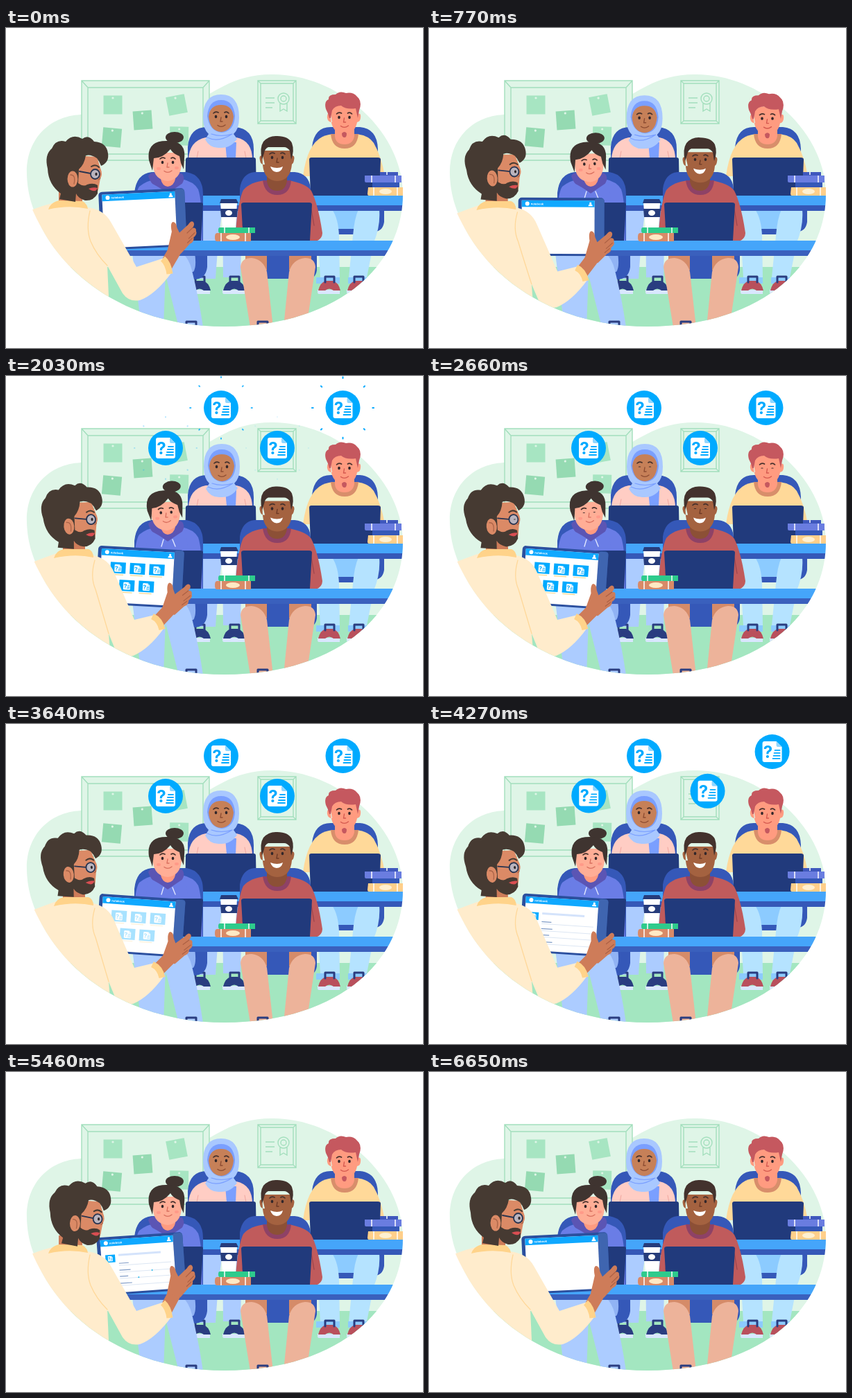
An HTML page for the animation above (6720 ms loop, 601 by 462 pixels).

```html
<!DOCTYPE html>
<html lang="en">
<head>
<meta charset="utf-8">
<title>Classroom questions</title>
<style>
html,body{margin:0;width:100%;height:100%;overflow:hidden;background:#fff}
svg{display:block;width:100vw;height:100vh}
text{font-family:Inter,Roboto,sans-serif;font-weight:700}
.line{fill:none;stroke-linecap:round;stroke-linejoin:round}
.frame{fill:#dff5e7;stroke:#a3dfbd;stroke-width:1.4}
#cuff{stroke-linecap:butt}
</style>
</head>
<body>
<svg viewBox="0 0 601 462">
<defs>
  <path id="blob" d="M30 212C28 160 64 125 112 125C170 124 215 125 262 112C300 95 325 67 383 67C480 66 572 150 572 240C572 345 475 431 315 431C190 431 95 370 52 290C38 262 31 240 30 212Z"/>
  <clipPath id="stage"><path d="M0 0H601V240H572C572 345 475 431 315 431C190 431 95 370 52 290Q43 274 38 262L0 240Z"/></clipPath>
  <clipPath id="ground"><use href="#blob"/></clipPath>
  <g id="doc">
    <path fill="#fff" d="M-11 -15H6L14 -7V12Q14 15 11 15H-11Q-14 15 -14 12V-12Q-14 -15 -11 -15Z"/>
    <path fill="#8fd6ff" d="M6 -15V-9Q6 -7 8 -7H14Z"/>
    <text x="-6" y="9" font-size="24" text-anchor="middle" fill="#0af">?</text>
    <path class="line" stroke="#0af" stroke-width="1.8" d="M4 -2H11M3 2H11M2 6H11M1 10H11"/>
  </g>
  <g id="icon"><circle r="25" fill="#0af"/><use href="#doc"/></g>
  <g id="card">
    <rect x="-11" y="-8.5" width="22" height="16" fill="#0af"/>
    <use href="#doc" transform="scale(.36)"/>
    <path stroke="#ffd78e" stroke-width="1.2" d="M-10 9.5H8"/>
  </g>
</defs>

<use href="#blob" fill="#dff5e7"/>
<path clip-path="url(#ground)" fill="#a3e6c0" d="M0 345H601V462H0Z"/>

<g id="wall">
  <path class="frame" d="M109 76H293V191H109ZM118 86H284V182H118ZM109 76L118 86M293 76L284 86M109 191L118 182M293 191L284 182"/>
  <path class="frame" d="M363 76H418V138H363ZM367 80H414V134H367ZM363 76L367 80M418 76L414 80M363 138L367 134M418 138L414 134M374 101H387M374 108H387M374 115H384M395 109V120L400 117L405 120V109"/>
  <circle class="frame" cx="400" cy="102" r="8"/><circle class="frame" cx="400" cy="102" r="4"/>
</g>

<g clip-path="url(#stage)">
  <!-- back row: chairs and bodies -->
  <path fill="#3558b8" d="M262 200V172Q264 143 290 143H330Q357 145 357 175V200ZM441 200V172Q444 143 468 143H510Q535 145 536 175V200Z"/>
  <path fill="#ffcdc4" d="M263 190Q264 163 288 158H332Q355 163 355 190Z"/>
  <path class="line" stroke="#efa79f" d="M275 188L277 178M346 188L344 178"/>
  <path fill="#7a9fff" d="M316 165H332L331 188H318Z"/>
  <path fill="#ffd999" d="M428 214Q434 168 456 157Q465 153 475 153H503Q522 154 530 166Q541 185 546 214Z"/>
  <path fill="#d88e6b" d="M468 153H508Q506 174 488 174Q470 174 468 153Z"/>
  <path fill="#ff9b80" d="M474 144H502V156Q500 168 488 168Q475 168 474 156Z"/>
  <g id="h1">
    <path fill="#a9c8ff" d="M284 129Q284 96 310 96Q336 96 336 129Q336 146 328 153L333 160Q324 174 308 173Q294 174 287 161L292 153Q284 146 284 129Z"/>
    <path fill="#7a9fff" d="M290 127Q292 104 310 104Q328 104 330 127Q329 149 311 151Q293 149 290 127Z"/>
    <path fill="#c68058" d="M292 128Q294 111 310 111Q326 111 328 128Q326 149 310 150Q294 149 292 128Z"/>
    <path class="line" stroke="#7a9fff" stroke-width="1.2" d="M290 158Q306 166 326 153M296 153Q310 158 326 153"/>
  </g>
  <g id="h2">
    <path fill="#ff9b80" d="M468 112H507V128Q506 152 488 154Q470 152 468 131ZM468 124Q462 122 463 130Q464 136 470 136ZM507 124Q512 122 511 130Q510 136 506 136Z"/>
    <path fill="#c5585f" d="M466 130Q464 122 461 117Q458 106 465 103Q464 96 475 96Q481 90 490 94Q500 92 506 99Q514 106 509 119L507 130L504 116Q490 118 483 112Q474 112 470 119L468 130ZM484 152Q488 148 491 152Q491 158 488 158Q484 158 484 152Z"/>
  </g>
  <!-- back row: seats, legs, desk -->
  <path fill="#3558b8" d="M443 262H545V280Q543 294 530 294H503V298H473V294H445Z"/>
  <path fill="#8ccbff" d="M468 262H508V290H468Z"/>
  <path fill="#b5e3ff" d="M447 262H470Q479 275 480 300L481 360H453ZM508 262H538Q540 285 530 310L520 360H494L500 300Q502 275 508 262Z"/>
  <path fill="#acccff" d="M283 262H312Q306 300 302 362H277ZM312 262H340L338 360H313Z"/>
  <path fill="#8ccbff" d="M447 360H481V369H447ZM493 360H521V369H493Z"/>
  <g id="shoes"></g>
  <path fill="#45a5fa" d="M265 242H601V256H265Z"/><path fill="#3558b8" d="M265 256H601V264H265Z"/>
  <path fill="#213a7c" d="M262 187H357Q360 187 360 190L361 242H258L259 190Q259 187 262 187ZM440 187H536Q540 187 540 190L538 242H439L437 190Q437 187 440 187Z"/>
  <g>
    <path fill="#3f58bd" d="M539 208H565V213H539Z"/>
    <path fill="#6a7de0" d="M517 213H570V223H519Q517 223 517 221Z"/>
    <path stroke="#fff" stroke-width="1.5" d="M527 213V223M561 213V223M549 208V212"/>
    <path fill="#3558b8" d="M528 223H567V231H528Z"/>
    <path fill="#ffcf8a" d="M522 230H572V242H523Q521 242 521 239Z"/>
    <ellipse cx="547" cy="236" rx="9" ry="4" fill="#fff0cf"/>
    <path stroke="#fff" stroke-width="1.5" d="M530 230V242M564 230V242"/>
  </g>

  <!-- front row -->
  <path fill="#3558b8" d="M185 310V238Q188 210 210 208H260Q284 212 284 240V310ZM337 260V232Q340 210 358 208H416Q437 210 439 232V260Z"/>
  <path fill="#6a7de6" d="M183 308Q184 240 192 229Q203 220 218 218H252Q270 221 277 233Q283 250 283 308Z"/>
  <path fill="#5b55b4" d="M205 214Q207 208 218 209H250Q258 211 256 220Q250 236 234 239Q212 234 205 214Z"/>
  <path fill="#ff9b80" d="M223 208H244V218Q242 228 233 229Q225 228 223 218Z"/>
  <path fill="#6a7de6" d="M205 222Q222 230 233 239Q246 230 258 222L262 245H202Z"/>
  <path class="line" stroke="#dfe6ff" stroke-width="1.4" d="M227 236L224 246M240 236L244 246"/>
  <path fill="#c05b5c" d="M330 304Q334 250 342 234Q352 222 374 220H406Q432 224 440 235Q450 255 456 296Q456 304 447 308H338Q330 308 330 304Z"/>
  <path class="line" stroke="#9c454d" stroke-width="1.3" d="M344 262L341 285M440 262L444 285"/>
  <path fill="#8e4266" d="M370 220H411Q409 241 391 241Q373 241 370 220Z"/>
  <path fill="#8c5036" d="M376 207H405V220Q403 235 391 235Q378 235 376 221Z"/>
  <g id="h0">
    <ellipse cx="243" cy="158" rx="13" ry="8" fill="#3f3430"/>
    <path fill="#ffae96" d="M211 180H253V198Q251 219 233 221Q214 219 212 200Z"/>
    <path fill="#3f3430" d="M206 191Q202 163 231 163Q260 162 257 188L256 204L252 195L250 185Q240 181 237 175Q226 188 213 188L212 197L211 206Z"/>
    <path class="line" stroke="#ff8179" stroke-width="4" opacity=".45" d="M219 203H221M245 202H247"/>
  </g>
  <g id="h3">
    <path fill="#a46240" d="M369 177H412V197Q410 220 391 221Q372 220 370 198ZM370 184Q364 183 366 191Q367 198 373 197ZM411 184Q417 183 415 191Q414 198 409 197Z"/>
    <path fill="#43322d" d="M369 190Q365 173 371 164Q379 155 391 156Q407 156 412 166Q416 177 411 190L409 177Q405 172 401 172H378Q373 174 372 181Z"/>
  </g>
  <path fill="#3558b8" d="M252 325H290V345Q288 363 270 363H258ZM350 325H448V350Q446 362 436 362H376Z"/>
  <path fill="#91b3f4" d="M250 325H272Q275 345 270 352H252Z"/>
  <path fill="#acccff" d="M182 325H231L227 432H195ZM222 325H254Q264 333 268 350Q278 390 284 432H249Z"/>
  <path fill="#d58b69" d="M345 325H376V350H345ZM408 325H440V350H408Z"/>
  <path fill="#edb39a" d="M338 345Q339 332 354 332Q371 334 376 352L385 432H352ZM446 345Q445 332 431 332Q413 334 408 352L400 432H433Z"/>
  <path class="line" stroke="#2a3d80" stroke-width="3" d="M260 430V424H274V430M363 430V424H377V430"/>
  <path fill="#45a5fa" d="M170 307H601V321H170Z"/><path fill="#3a60bd" d="M170 321H601V329H170Z"/>
  <path fill="#213a7c" d="M343 252H437Q441 252 441 255L438 307H342L339 255Q339 252 343 252ZM190 252H281Q284 252 284 255L281 307H190Z"/>
  <path fill="#fff" d="M309 252H333L331 289H312Z"/>
  <path fill="#263c7b" d="M308 253L310 247H332L335 253ZM309 261H334L333 273H310Z"/>
  <ellipse cx="321" cy="267" rx="5" ry="4" fill="#fff"/>
  <path fill="#2ecb8c" d="M308 288H359V296H308Q306 296 306 292Q306 288 308 288Z"/>
  <path fill="#d88a68" d="M304 296H353V308H304Q301 308 301 302Q301 296 304 296Z"/>
  <ellipse cx="327" cy="302" rx="10" ry="4" fill="#ffe9c4"/>
  <path stroke="#fff" stroke-width="1.5" d="M315 288V296M350 288V296M310 296V308M345 296V308"/>

  <!-- teacher -->
  <g class="tablet">
    <rect x="-62" y="-42" width="124" height="84" rx="5" fill="#2b4f9e"/>
    <rect x="48" y="-41" width="14" height="82" rx="4" fill="#3f65b0"/>
    <rect x="-57" y="-38" width="105" height="77" fill="#fff"/>
    <rect x="-57" y="-38" width="105" height="9.5" fill="#0fa8ff"/>
    <circle cx="-49" cy="-33.3" r="3" fill="#fff"/>
    <text x="-44" y="-31.5" font-size="4" fill="#fff">notebook</text>
    <circle cx="42" cy="-34.2" r="1.6" fill="#fff"/><path fill="#fff" d="M39 -30Q39 -33 42 -33Q45 -33 45 -30Z"/>
    <g id="cards"></g>
    <g id="detail">
      <rect x="-51" y="-16" width="14" height="11" fill="#0af"/>
      <use href="#doc" transform="translate(-44 -10.5) scale(.25)"/>
      <path stroke="#d4e3fb" stroke-width="3" d="M-32 -15H29"/>
      <path stroke="#dce6f3" stroke-width="1" d="M-32 0H43M-32 10H43M-32 19H43M-32 29H43"/>
      <path stroke="#7f9bc7" stroke-width="1.2" d="M-32 -3H-18M-32 7H-16M-32 16H-20M-32 26H-15"/>
      <g id="dots" fill="#1cb5e8"></g>
    </g>
  </g>
  <path id="forearm" class="line" stroke="#ce7c59" stroke-width="19"/>
  <g class="tablet">
    <path fill="#ce7c59" d="M41 20Q39 8 43 6Q48 6 49 15L52 22L65 11Q70 4 73 8Q75 12 71 16Q77 15 76 21Q78 25 72 30Q73 36 66 39L53 52L34 45Z"/>
    <path class="line" stroke="#ac6044" stroke-width="1.2" d="M71 16L63 23M74 23L65 31M70 31L63 37"/>
  </g>
  <path id="neck" fill="#ce7c59"/>
  <path id="shirt" fill="#ffeccc"/>
  <path id="cuff" class="line" stroke="#ffd38a" stroke-width="9"/>
  <path id="seam" class="line" stroke="#ffd89a" stroke-width="1.3"/>
  <path id="collar" fill="#ffd38a"/>
  <g id="head">
    <path fill="#db8a66" d="M98 184L131 186L136 202Q140 212 136 217L134 228Q132 247 116 248Q98 243 96 220Z"/>
    <path fill="#463a32" d="M77 247L79 239Q61 226 60 203Q55 183 66 174Q72 160 86 164Q96 152 110 160Q119 153 127 164Q145 165 147 181Q149 194 137 199Q135 193 131 188Q122 182 115 184Q113 197 105 204L104 224Q112 230 117 226Q126 223 132 227L132 239Q126 250 114 249Q104 246 101 239L100 251Z"/>
    <ellipse cx="96" cy="218" rx="7.5" ry="11.5" fill="#db8a66"/>
    <path class="line" stroke="#aa6347" stroke-width="1.3" d="M93 212Q101 212 98 225M134 215Q138 217 133 219"/>
    <path fill="#d94e52" d="M119 232Q126 229 132 231Q129 239 119 232Z"/>
    <path class="line" stroke="#463a32" stroke-width="2" d="M123 200Q129 196 134 201"/>
    <ellipse cx="128.5" cy="211" rx="6.5" ry="7" fill="#aacbee" fill-opacity=".65" stroke="#283450" stroke-width="1.8"/>
    <path class="line" stroke="#283450" stroke-width="1.8" d="M106 207L122 210"/>
    <ellipse class="eye" cx="130" cy="211" rx="1.6" ry="2.2" fill="#30282a"/>
  </g>
</g>
<g id="icons"></g>
</svg>
<script>
const LOOP = 6720;
const $ = id => document.getElementById(id);
const clamp = v => Math.max(0, Math.min(1, v));
const ramp = (t, start, len) => clamp((t - start) / len);
const smooth = u => u * u * (3 - 2 * u);
const outCubic = u => 1 - (1 - u) ** 3;
const inBack = u => u * u * (2.1 * u - 1.1);
const set = (el, name, value) => el.setAttribute(name, value);
const move = (el, x, y, rest = '') => set(el, 'transform', `translate(${x} ${y}) ${rest}`);

// Eased value list at time t from rows of [time, ...values]
function keys(t, rows) {
  const i = rows.findIndex(r => r[0] > t);
  if (i < 0) return rows.at(-1).slice(1);
  const a = rows[i - 1], b = rows[i], u = smooth((t - a[0]) / (b[0] - a[0]));
  return a.slice(1).map((v, j) => v + (b[j + 1] - v) * u);
}

// Blend two paths of equal structure
function mix(a, b, k) {
  const number = /-?[\d.]+/g, ends = b.match(number);
  let i = 0;
  return a.replace(number, v => +v + (ends[i++] - v) * k);
}

// Static repeats
[[154, 111, 0], [197, 133, -4], [246, 111, -11], [152.5, 158, 5], [249.5, 156, 1]].forEach(([x, y, r], i) => {
  $('wall').innerHTML += `<g transform="translate(${x} ${y}) rotate(${r})">
    <rect x="-13.5" y="-13.5" width="27" height="27" fill="${i % 2 ? '#95dab2' : '#a7e5c2'}"/>
    <circle cy="-10" r="1.6" fill="#dff5e7"/></g>`;
});
[[279, '#2a3d80'], [329, '#2a3d80'], [466, '#b9505c'], [508, '#b9505c']].forEach(([x, c]) => {
  $('shoes').innerHTML += `<g transform="translate(${x} 371)">
    <path fill="#d9e7ff" d="M-17 7H15V13H-15Q-17 13 -17 10Z"/>
    <path fill="${c}" d="M-16 8Q-13 -4 -5 -6H5Q13 -4 16 8H6Q0 3 -6 8Z"/>
    <path class="line" stroke="#2a3d80" stroke-width="3" d="M-6 -4V-12H7V-4"/></g>`;
});

const students = [
  {x: 233, y: 194, skin: '#d9705f', dip: [-1, 2, -3], wait: 0},
  {x: 310, y: 128, skin: '#8d4c32', dip: [1, 2, 0], wait: 80},
  {x: 487.5, y: 129, skin: '#d4594f', dip: [0, 3, 0], wait: 160},
  {x: 391, y: 187, skin: '#6d3a26', dip: [0, 3.5, 0], wait: 60, grin: true}
];
students.forEach((s, i) => {
  s.head = $('h' + i);
  const mouth = s.grin
    ? '<path fill="#fff" stroke="none" d="M-10 13Q0 17 8 13Q6 21 -1 21Q-8 20 -10 13Z"/>'
    : '<path d="M-5 12.5Q0 16.5 6 12"/>';
  s.head.innerHTML += `<g class="face"><g class="line" stroke="${s.skin}" stroke-width="1.4">
    <path d="M0 1L-1 7H2"/>${mouth}</g>
    <path class="line" stroke="#46312d" stroke-width="1.7" d="M-11 -5Q-8 -8 -4 -6M5 -6Q8 -8 11 -5"/>
    <ellipse class="eye" cx="-7.5" rx="1.8" ry="2.2" fill="#33272a"/>
    <ellipse class="eye" cx="7.5" rx="1.8" ry="2.2" fill="#33272a"/></g>`;
  s.face = s.head.querySelector('.face');
});

const cards = [[-32, -11], [-4, -11], [24, -11], [-18, 14], [10, 14]];
$('cards').innerHTML = cards.map(() => '<use href="#card"/>').join('');
const dots = [[15, 10], [-5, 19], [41, 29]];
$('dots').innerHTML = dots.map(([x, y]) => `<circle cx="${x}" cy="${y}"/>`).join('');

const icons = [
  {x: 230, y: 104, show: 1180, fly: 4235},
  {x: 310, y: 46, show: 1272, fly: 4325},
  {x: 391, y: 104, show: 1150, fly: 4060},
  {x: 485.5, y: 46, show: 1335, fly: 4150}
];
$('icons').innerHTML = icons.map(() =>
  '<g><path class="line" stroke="#0af" stroke-width="2"/><use href="#icon"/></g>').join('');
icons.forEach((icon, i) => {
  icon.el = $('icons').children[i];
  [icon.rays, icon.badge] = icon.el.children;
});

const tabletKeys = [
  [0, 197, 276, -2.7], [150, 197, 276, -2.7], [900, 190, 288, .5], [1540, 190, 288, 1],
  [2300, 194, 291, 4], [4200, 194, 291, 4], [4800, 198, 277, -2], [5460, 195, 277, -4], [6650, 197, 276, -2.7]];
const headKeys = [
  [0, 0, 0, 0], [150, 0, 0, 0], [900, -3, -3, -5], [1540, -2, -3, -4],
  [2300, -3, -3, -6], [4200, -3, -3, -6], [4760, -1, 0, 0], [5460, 3, 1, 1], [6650, 0, 0, 0]];
const bendKeys = [[0, 0], [150, 0], [900, 1], [4200, 1], [4800, 0]];
const nodKeys = [[0, 0], [300, 0], [1000, 1], [2700, 1], [3400, 0]];

const parts = {
  neck: ['M76 236H110V258H76Z', 'M82 236H114V260H82Z'],
  shirt: [
    'M20 270Q50 256 76 251L117 259Q141 262 151 280L188 345L228 332Q236 340 238 354Q215 385 193 393Q177 396 168 383L146 343L149 410L20 410Z',
    'M20 276Q55 262 84 252L126 259Q148 264 156 284L185 352L214 345Q225 350 227 365Q205 395 183 404Q166 407 157 394L148 372L151 410L20 410Z'],
  cuff: ['M226 333Q234 340 236 355', 'M211 347Q222 352 225 366'],
  seam: ['M121 264Q115 290 122 308Q130 327 146 343', 'M128 266Q121 290 129 308Q136 332 148 372'],
  collar: ['M61 262Q64 252 76 249L110 250Q117 253 118 261Q90 255 61 262Z',
    'M69 263Q72 252 84 250L119 250Q126 253 126 262Q99 256 69 263Z']
};

function drawTeacher(t) {
  const [bend] = keys(t, bendKeys);
  for (const id in parts) set($(id), 'd', mix(...parts[id], bend));
  const [tx, ty, turn] = keys(t, tabletKeys);
  document.querySelectorAll('.tablet').forEach(el => move(el, tx, ty, `rotate(${turn})`));
  const wrist = mix('M230 344', 'M216 358', bend);
  set($('forearm'), 'd', `${wrist}L${tx + 50} ${ty + 39}`);
  const [hx, hy, tilt] = keys(t, headKeys);
  move($('head'), hx, hy, `rotate(${tilt} 118 245)`);
}

function drawScreen(t) {
  const gone = ramp(t, 3430, 320);
  cards.forEach(([x, y], i) => {
    const shown = ramp(t, 1100 + 90 * i, 450), el = $('cards').children[i];
    move(el, x, y + 4 * (1 - outCubic(shown)));
    set(el, 'opacity', shown * (1 - gone));
  });
  set($('detail'), 'opacity', ramp(t, 3800, 400) * (1 - ramp(t, 5600, 400)));
  dots.forEach((d, i) => {
    const r = 2.2 * outCubic(ramp(t, 4400 + 150 * i, 300)) - 1.2 * ramp(t, 5100, 350);
    set($('dots').children[i], 'r', Math.max(0, r));
  });
}

function drawStudents(t) {
  for (const s of students) {
    const [nod] = keys(Math.max(0, t - s.wait), nodKeys), [dx, dy, turn] = s.dip;
    move(s.head, dx * nod, dy * nod, `rotate(${turn * nod} ${s.x} ${s.y + 25})`);
    move(s.face, s.x, s.y + nod);
  }
  const blink = Math.max(...[2660, 5950].map(at => 1 - clamp(Math.abs(t - at) / 120)));
  document.querySelectorAll('.eye').forEach(el => set(el, 'ry', 2.2 - 1.7 * blink));
}

function drawIcons(t) {
  for (const icon of icons) {
    const grow = outCubic(ramp(t, icon.show, 500));
    const flight = ramp(t, icon.fly, 600), p = inBack(flight);
    const x = icon.x + (155 - icon.x) * p, y = icon.y + (265 - icon.y) * p + 50 * (1 - grow);
    const size = grow * (1 - .6 * Math.max(0, p)), turn = -40 * (1 - grow);
    set(icon.el, 'visibility', t > icon.show && flight < 1 ? 'visible' : 'hidden');
    move(icon.el, x, y, `rotate(${turn})`);
    set(icon.badge, 'transform', `scale(${size})`);

    const u = ramp(t, icon.show + 200, 700), tip = 28 + 17 * outCubic(u), base = tip - 6 * (1 - u);
    let d = '';
    if (u > 0 && u < 1) for (let i = 0; i < 8; i++) {
      const c = Math.cos(i * Math.PI / 4), s = Math.sin(i * Math.PI / 4);
      d += `M${c * base} ${s * base}L${c * tip} ${s * tip}`;
    }
    set(icon.rays, 'd', d);
    set(icon.rays, 'opacity', clamp((1 - u) * 4));
  }
}

function frame() {
  const t = performance.now() % LOOP;
  drawTeacher(t);
  drawScreen(t);
  drawStudents(t);
  drawIcons(t);
  requestAnimationFrame(frame);
}
frame();
</script>
</body>
</html>
```
